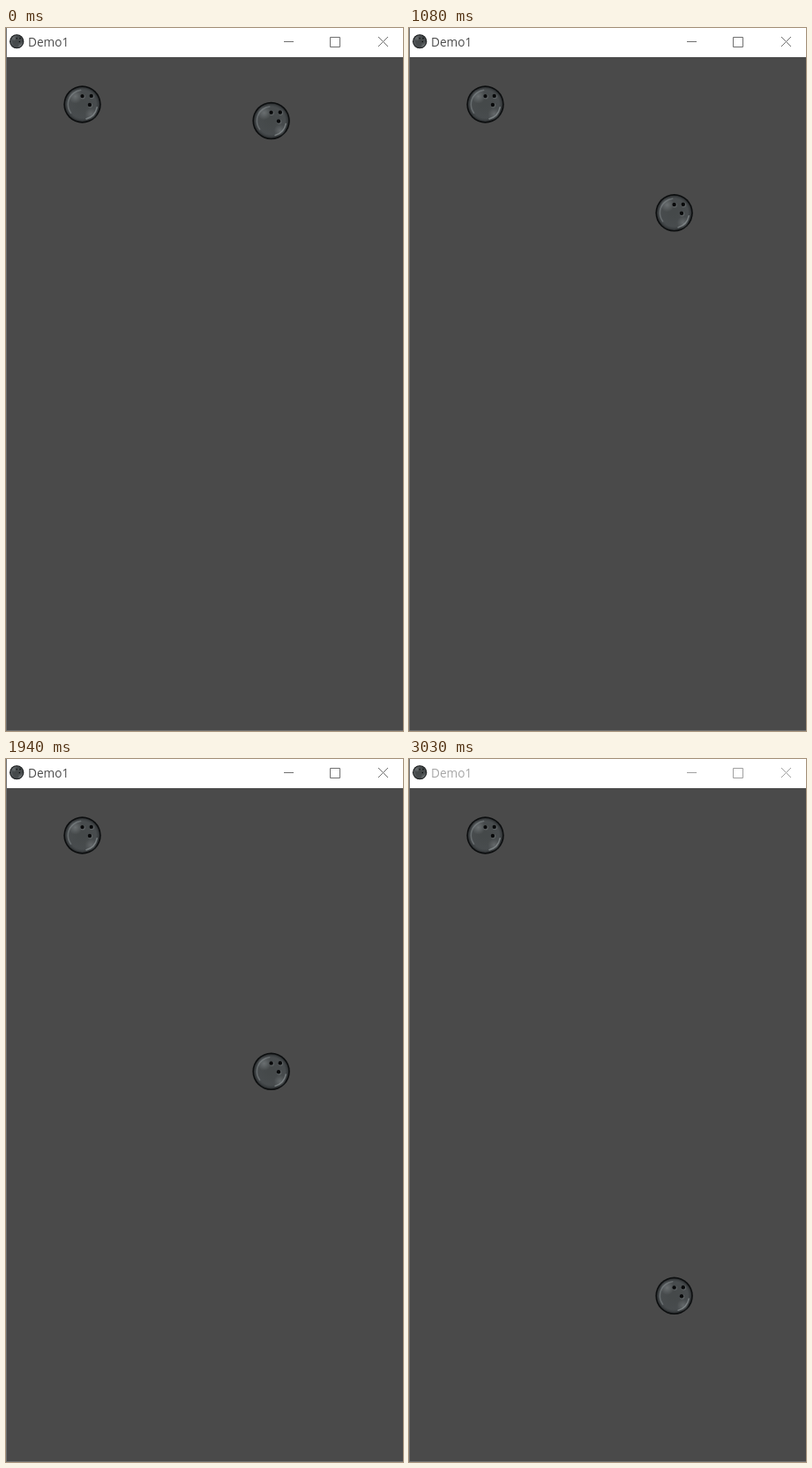
An HTML page with a canvas for the animation above (3.13 s loop, 450 px wide and 796 px high).

```html
<!DOCTYPE html>
<html lang="en">
<head>
<meta charset="utf-8">
<title>Demo1</title>
<style>
  html, body { margin: 0; width: 100%; height: 100%; overflow: hidden; background: #4a4a4a; }
  canvas { display: block; width: 450px; height: 796px; }
</style>
</head>
<body>
<canvas id="stage" width="450" height="796"></canvas>
<script>
const ctx = document.getElementById('stage').getContext('2d');
const LOOP = 3130;
const STOP = 3030; // the window loses focus and the ball rests

// Free fall with a slight slowdown at the end
function fallY(t) {
  const s = t - 0.08 * Math.max(0, t - 2710);
  return 105 + 0.05667 * s + 3.684e-5 * s * s;
}

function disc(x, y, r, fill) {
  ctx.beginPath();
  ctx.arc(x, y, r, 0, Math.PI * 2);
  ctx.fillStyle = fill;
  ctx.fill();
}

function glow(x, y, r, alpha) {
  const g = ctx.createRadialGradient(x, y, 0, x, y, r);
  g.addColorStop(0, `rgba(160,166,168,${alpha})`);
  g.addColorStop(1, 'rgba(160,166,168,0)');
  disc(x, y, r, g);
}

function rim(r, from, to, alpha) {
  ctx.beginPath();
  ctx.arc(0, 0, r, from, to);
  ctx.strokeStyle = `rgba(150,157,159,${alpha})`;
  ctx.lineWidth = 1.6;
  ctx.lineCap = 'round';
  ctx.stroke();
}

function ball(x, y, scale = 1) {
  ctx.save();
  ctx.translate(x, y);
  ctx.scale(scale, scale);
  disc(0, 0, 21.2, '#0c0e0f');
  const body = ctx.createRadialGradient(-1, -1, 4, 0, 0, 19.6);
  body.addColorStop(0, '#45494a');
  body.addColorStop(0.75, '#484c4e');
  body.addColorStop(0.87, '#3f4345');
  body.addColorStop(1, '#2c2f31');
  disc(0, 0, 19.6, body);
  rim(16.2, 2.5, 4.6, 0.4);
  rim(17, 0.2, 1.3, 0.6);
  glow(-8, -9, 8, 0.4);
  glow(10, 11, 7, 0.3);
  for (const [hx, hy] of [[0, -9.4], [10.2, -9.6], [8.4, 0.5]]) {
    disc(hx + 0.6, hy + 0.6, 2.8, 'rgba(125,131,133,0.4)');
    disc(hx, hy, 2.2, '#08090a');
  }
  ctx.restore();
}

function cursor(points, x, y) {
  ctx.beginPath();
  for (const [px, py] of points) ctx.lineTo(x + px, y + py);
  ctx.closePath();
  ctx.strokeStyle = '#2c2c2c';
  ctx.lineWidth = 1.2;
  ctx.stroke();
  ctx.fillStyle = '#fff';
  ctx.fill();
}

function moveCursor(x, y) {
  let arm = [[-1, -1], [-1, -5], [-3.5, -5], [0, -8.8], [3.5, -5], [1, -5]];
  const points = [];
  for (let q = 0; q < 4; q++) {
    points.push(...arm);
    arm = arm.map(([px, py]) => [-py, px]);
  }
  cursor(points, x, y);
}

function arrowCursor(x, y) {
  cursor([[0, 0], [0, 16], [3.7, 12.5], [6, 18], [8.5, 17], [6.2, 11.5], [11, 11.5]], x, y);
}

function titleBar(active) {
  ctx.fillStyle = '#fff';
  ctx.fillRect(0, 0, 450, 33);
  ball(12.2, 15.3, 0.38);
  ctx.fillStyle = active ? '#4c4c4c' : '#a6a6a6';
  ctx.font = '13.6px "Open Sans", "Noto Sans", sans-serif';
  ctx.fillText('Demo1', 25, 21);
  ctx.strokeStyle = active ? '#707070' : '#a0a0a0';
  ctx.lineWidth = 1;
  ctx.lineCap = 'butt';
  ctx.beginPath();
  ctx.moveTo(315, 15.5);
  ctx.lineTo(326, 15.5);
  ctx.rect(367.5, 10.5, 11, 11);
  ctx.moveTo(422, 10);
  ctx.lineTo(433, 21);
  ctx.moveTo(433, 10);
  ctx.lineTo(422, 21);
  ctx.stroke();
}

function draw(t) {
  ctx.fillStyle = '#4a4a4a';
  ctx.fillRect(0, 0, 450, 796);
  titleBar(t < STOP);
  ctx.fillStyle = '#717171';
  ctx.fillRect(0, 0, 1, 796);
  ctx.fillRect(0, 795, 450, 1);
  ball(86.5, 86.5);
  ball(300.6, fallY(Math.min(t, STOP)));
  if (t >= 1360 && t < 1420) moveCursor(42.5, 55);
  if (t >= 2620 && t < 2650) arrowCursor(419.5, 786.5);
}

const begin = performance.now();
function frame() {
  draw((performance.now() - begin) % LOOP);
  requestAnimationFrame(frame);
}
frame();
</script>
</body>
</html>
```
